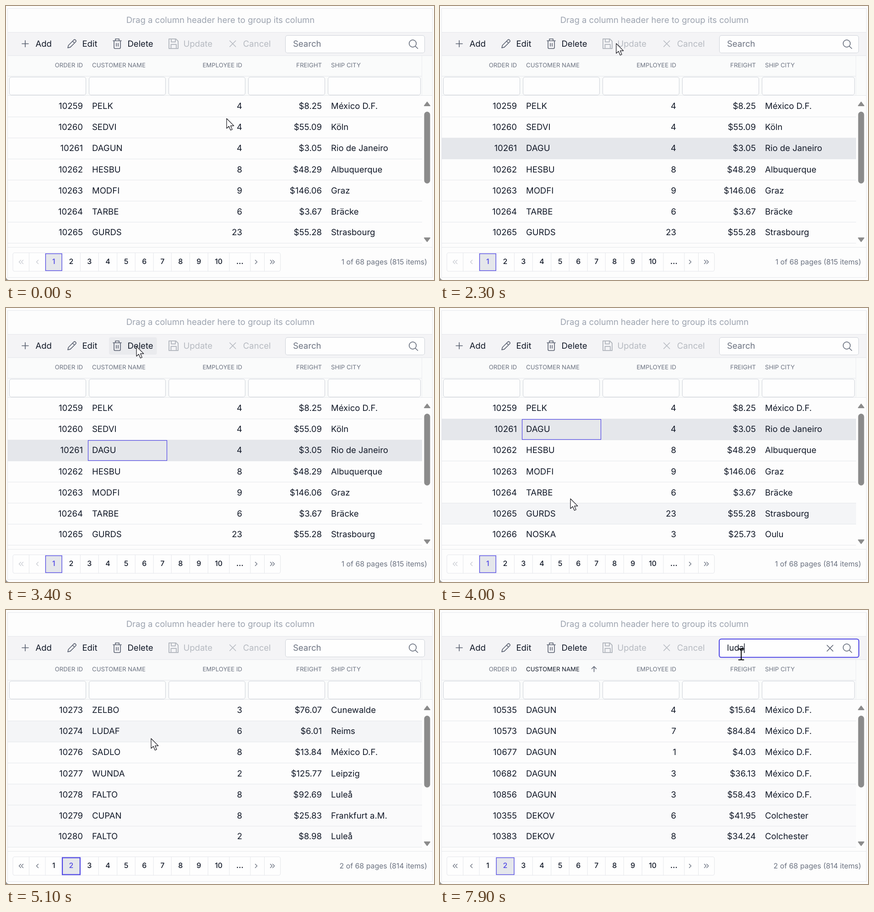
Animation, 935 px wide and 599 px high, one loop 8000 ms. Source, as an HTML page:

```html
<!DOCTYPE html>
<html lang="en">
<head>
<meta charset="utf-8">
<title>Order grid</title>
<style>
  html, body { margin: 0; width: 100%; height: 100%; overflow: hidden; background: #fdfdfd; }
  svg { display: block; width: 935px; height: 599px; }
  text { font-family: Inter, "Liberation Sans", sans-serif; text-rendering: geometricPrecision; white-space: pre; }
</style>
</head>
<body>
<svg id="stage" viewBox="0 0 935 599"></svg>
<script>
const LOOP = 8000, STEP = 100;
const INK = '#111827', ICON = '#596070', GRAY = '#6b7280', MUTED = '#9ca3af', OFF = '#b6bac1';
const LINE = '#e5e7eb', FIELD = '#d1d5db', HOVER = '#f4f5f7', PAPER = '#fefefe', ACCENT = '#4f46e5';
const CELL = 18.5, HEAD = 13.2, PAGE = 15.85;
const TOP = 196, PITCH = 46, LEFT = 4, RIGHT = 909;
const stage = document.getElementById('stage');
const pen = document.createElement('canvas').getContext('2d');

// When each action takes effect, in ms
const at = { select: 500, edit: 700, cut: 1300, caret: 1600, save: 2200, focus: 2800,
  remove: 3600, page: 4600, sort: 5700, search: 7000, type: 7400 };

const parse = s => s.trim().split('\n').map(r => r.trim().split('|'));
const firstPage = parse(`
  10259|PELK|4|$8.25|México D.F.
  10260|SEDVI|4|$55.09|Köln
  10261|DAGUN|4|$3.05|Rio de Janeiro
  10262|HESBU|8|$48.29|Albuquerque
  10263|MODFI|9|$146.06|Graz
  10264|TARBE|6|$3.67|Bräcke
  10265|GURDS|23|$55.28|Strasbourg
  10266|NOSKA|3|$25.73|Oulu`);
const secondPage = parse(`
  10273|ZELBO|3|$76.07|Cunewalde
  10274|LUDAF|6|$6.01|Reims
  10276|SADLO|8|$13.84|México D.F.
  10277|WUNDA|2|$125.77|Leipzig
  10278|FALTO|8|$92.69|Luleå
  10279|CUPAN|8|$25.83|Frankfurt a.M.
  10280|FALTO|2|$8.98|Luleå`);
const sortedPage = parse(`
  10535|DAGUN|4|$15.64|México D.F.
  10573|DAGUN|7|$84.84|México D.F.
  10677|DAGUN|1|$4.03|México D.F.
  10682|DAGUN|3|$36.13|México D.F.
  10856|DAGUN|3|$58.43|México D.F.
  10355|DEKOV|6|$41.95|Colchester
  10383|DEKOV|8|$34.24|Colchester`);

const columns = ['ORDER ID', 'CUSTOMER NAME', 'EMPLOYEE ID', 'FREIGHT', 'SHIP CITY'].map((title, i) => ({
  title, l: LEFT + 174 * i, r: i === 4 ? RIGHT : LEFT + 174 * (i + 1), end: i % 4 !== 1 && i !== 4
}));

// Pointer moves: start, end, x, y
const moves = [
  [0, 0, 482, 246],
  [0, 300, 295, 309],
  [800, 1100, 261, 290],
  [1700, 2100, 385, 82],
  [2300, 2600, 240, 300],
  [2800, 3000, 266, 220],
  [3100, 3400, 285, 84],
  [3500, 3900, 268, 478],
  [3900, 4000, 285, 417],
  [4000, 4400, 139, 566],
  [4600, 5100, 317, 281],
  [5100, 5300, 321, 141],
  [5300, 5500, 315, 134],
  [5600, 6100, 445, 168],
  [6100, 6300, 474, 208],
  [6400, 6500, 690, 218],
  [6600, 7000, 658, 97]
];
const clamp = v => Math.min(1, Math.max(0, v));
const smooth = v => v * v * (3 - 2 * v);

function pointerAt(t) {
  let [px, py] = moves[0].slice(2);
  for (const [from, to, x, y] of moves.slice(1)) {
    const f = smooth(clamp((t - from) / (to - from)));
    px += (x - px) * f;
    py += (y - py) * f;
  }
  return [px, py];
}

const text = (s, x, y, size, fill, extra = '') =>
  `<text x="${x}" y="${y}" font-size="${size}" fill="${fill}" ${extra}>${s}</text>`;
const END = 'text-anchor="end"', MID = 'text-anchor="middle"';
const rect = (x, y, r, b, fill, line = 'none', w = 1, rx = 0) =>
  `<rect x="${x}" y="${y}" width="${r - x}" height="${b - y}" rx="${rx}" fill="${fill}" stroke="${line}" stroke-width="${w}"/>`;
const stroke = (d, color, w = 1.6, fill = 'none') =>
  `<path d="${d}" fill="${fill}" stroke="${color}" stroke-width="${w}" stroke-linecap="round" stroke-linejoin="round"/>`;
const place = (x, y, content) => `<g transform="translate(${x} ${y})">${content}</g>`;
const hline = (y, r = RIGHT) => rect(LEFT, y, r, y + 1, LINE);
const field = (l, r, t, b) => rect(l + .5, t + .5, r - .5, b - .5, PAPER, FIELD, 1.1, 4.5);
const focusField = (l, r, t, b) => rect(l, t, r, b, PAPER, ACCENT, 2, 4.5);
const textWidth = (s, size, weight = 400) => {
  pen.font = `${weight} ${size}px Inter, "Liberation Sans", sans-serif`;
  return pen.measureText(s).width;
};
const cellText = (s, c, y, size, fill, pad = 10) =>
  text(s, c.end ? c.r - pad : c.l + pad, y, size, fill, c.end ? END : '');

function frameParts() {
  const arrow = (y, dir) => stroke(`M914 ${y + 4 * dir}L920 ${y - 4 * dir}L926 ${y + 4 * dir}Z`, '#8b8b8b', 2, '#8b8b8b');
  return rect(0, 0, 935, 599, '#fdfdfd') +
    rect(LEFT, 57, 931, 108, '#f4f4f6') + rect(LEFT, 108, 931, 195, '#fafbfb') +
    [57, 108, 195, 527].map(y => hline(y, 931)).join('') + hline(153) +
    rect(908, 109, RIGHT, 195, '#eceef1') + rect(3.5, 5.5, 931.5, 593.5, 'none', LINE) +
    `<path d="M0 593Q1 598 6 599H0Z" fill="#8f8f8f"/>` +
    text('Drag a column header here to group its column', 468.5, 37, CELL, MUTED, MID) +
    columns.map(c => field(c.l + 3, c.r - 3, 155, 195)).join('') +
    rect(913.5, 231, 926.5, 388, '#8b8b8b', 'none', 0, 6.5) + arrow(214, 1) + arrow(511, -1);
}

const cross = 'M-6.5 -6.5L6.5 6.5M6.5 -6.5L-6.5 6.5';
const tools = [
  { name: 'Add', x: 42, icon: 'M0 -7V7M-7 0H7' },
  { name: 'Edit', x: 144, icon: 'M-9 9L-7.6 3.5L4 -8.2Q6 -10 8 -8Q10 -6 8.2 -4L-3.5 7.6ZM1.5 -5.5L5.6 -1.5' },
  { name: 'Delete', x: 243, icon: 'M-9 -6.5H9M-4 -6.5V-10.5H4V-6.5M-7 -6.5V8Q-7 10.5 -5 10.5H5Q7 10.5 7 8V-6.5M-2 -1V5.5M2 -1V5.5' },
  { name: 'Update', x: 366, icon: 'M-10 -10.5H5L10 -5.5V10.5H-10ZM-5 -10V-4H4V-10M-5.5 10V1.5H6V10', w: 2 },
  { name: 'Cancel', x: 495.3, icon: cross }
];

function toolbar(t, edit) {
  const [px, py] = pointerAt(t);
  let out = tools.map((tool, i) => {
    const on = edit === i > 2;
    const label = tool.x + 23 - (tool.name === 'Update' ? 1.5 : .5);
    const l = tool.x - 18, r = label + textWidth(tool.name, CELL) + 8;
    const over = on && py > 63 && py < 103 && px > l && px < r;
    return (over ? rect(l, 64, r, 102, '#eaebee', 'none', 0, 4) : '') +
      place(tool.x, 82.5, stroke(tool.icon, on ? ICON : OFF, tool.w)) +
      text(tool.name, label, 89, CELL, on ? INK : OFF);
  }).join('');

  const focus = t >= at.search;
  const typed = 'luda'.slice(0, Math.max(0, Math.round((t - at.type) / 125)));
  out += focus ? focusField(610, 915, 63.5, 103.5) : field(610, 915, 64, 103);
  out += text(typed || 'Search', 627, 89, CELL, typed ? INK : GRAY);
  if (focus) {
    const x = 627 + textWidth(typed, CELL);
    out += rect(x, 73, x + 1.4, 94, INK);
  }
  if (typed) out += place(852, 83.5, stroke(cross, ICON));
  return out + stroke('M880.7 82A7.8 7.8 0 1 1 896.3 82A7.8 7.8 0 1 1 880.7 82M894.2 87.8L899.5 93', GRAY, 1.7);
}

function header(sorted) {
  return columns.map((c, i) => cellText(c.title, c, 134, HEAD, sorted && i === 1 ? INK : GRAY)).join('') +
    (sorted ? stroke('M336.5 135V123.5M331.5 128.5L336.5 123.5L341.5 128.5', ICON, 1.5) : '');
}

function editRow(row, t) {
  const values = [row[0], t < at.cut ? row[1] : row[1].slice(0, -1), row[2], row[3].slice(1), row[4]];
  return rect(LEFT, 289, RIGHT, 333, '#f2f3f6') + columns.map((c, i) =>
    (i === 1 ? focusField(c.l + 10, c.r - 10, 290.5, 330) : field(c.l + 11, c.r - 11, 291, 331)) +
    cellText(values[i], c, 318, CELL, i ? INK : MUTED, c.end ? 24.5 : 27)).join('') +
    (t >= at.caret ? rect(258, 300, 259.3, 323, INK) : '');
}

function rowsAt(t) {
  if (t >= at.sort) return sortedPage;
  if (t >= at.page) return secondPage;
  return firstPage
    .map((r, i) => i === 2 && t >= at.save ? [r[0], r[1].slice(0, -1), ...r.slice(2)] : r)
    .filter((r, i) => i !== 1 || t < at.remove);
}

function grid(t, edit, page2) {
  const selected = page2 || t < at.select ? -1 : t >= at.remove ? 1 : 2;
  // The highlight trails the pointer a little
  const [hx, hy] = pointerAt(t - 30);
  const over = t > at.save && t < at.sort && hx < RIGHT ? Math.floor((hy - TOP) / PITCH) : -1;

  return rowsAt(t).slice(0, 7).map((row, i) => {
    const top = TOP + PITCH * i + 1, raised = edit && i > 1 && i < 5 ? 1 : 0;
    const bottom = TOP + PITCH * (i + 1) - raised;
    if (edit && i === 2) return editRow(row, t) + hline(bottom);
    const fill = i === selected ? LINE : i === over ? HOVER : page2 && i > 3 ? '#fafafb' : 'none';
    const base = 225 + PITCH * i + (i > 2 && i < 6 && !edit ? 1 : 0);
    return rect(LEFT, top, RIGHT, bottom, fill) + hline(bottom) +
      (i === selected && t >= at.focus ? rect(179.5, top + .5, 351.5, bottom - .5, 'none', ACCENT, 1.2) : '') +
      row.map((s, k) => cellText(s, columns[k], base, CELL, INK)).join('');
  }).join('');
}

function pager(t, page2) {
  const current = page2 ? 2 : 1, arrowWidth = 35.5;
  const divider = x => rect(x - .5, 540, x + .5, 580, LINE);
  const chevrons = (x, dir, color, count) => [0, 1].slice(0, count).map(k =>
    place(x + (count - 1) * (k * 5 - 2.5), 559.5, stroke(`M${2 * dir} -4L${-2 * dir} 0L${2 * dir} 4`, color, 1.4))).join('');
  const back = page2 ? GRAY : '#c9ccd2';
  let x = 15 + 2 * arrowWidth;
  let out = rect(15, 539.5, 599.5, 580, PAPER, LINE, 1.1, 4) + divider(15 + arrowWidth) + divider(x) +
    chevrons(33, 1, back, 2) + chevrons(68.5, 1, back, 1);

  for (let n = 1; n <= 11; n++) {
    const label = n > 10 ? '...' : String(n), weight = n > 10 ? 700 : 500;
    const w = 30 + textWidth(label, PAGE, weight), on = n === current;
    out += divider(x + w);
    if (on) out += rect(x + .5, 541.5, x + w - .5, 578.5, LINE, ACCENT, page2 && t < at.sort ? 2.2 : 1.3);
    out += text(label, x + w / 2, 564, PAGE, on ? ACCENT : INK, `${MID} font-weight="${weight}"`);
    x += w;
  }
  return out + divider(564.5) + chevrons(546.5, -1, GRAY, 1) + chevrons(582, -1, GRAY, 2) +
    text(`${current} of 68 pages (${t >= at.remove ? 814 : 815} items)`, 920, 564.5, PAGE, GRAY, END);
}

function pointer(t, edit) {
  const [x, y] = pointerAt(t);
  const within = (l, r, top, bottom) => x > l && x < r && y > top && y < bottom;
  const beam = columns.some(c => within(c.l + 3, c.r - 3, 155, 195)) ||
    within(610, 915, 64, 103) || edit && within(188, 342, 291, 330);
  return place(x, y, beam
    ? stroke('M-5.5 -12H-2Q0 -12 0 -10Q0 -12 2 -12H5.5M0 -10V10M-5.5 12H-2Q0 12 0 10Q0 12 2 12H5.5', '#000', 1.9)
    : stroke('M0 0V21.5L5 17L8.6 25.5L12.2 24L8.6 15.8H15.8Z', '#15151c', 1.2, '#fff'));
}

const backdrop = frameParts();

function draw(t) {
  const edit = t >= at.edit && t < at.save, page2 = t >= at.page;
  stage.innerHTML = backdrop + toolbar(t, edit) + header(t >= at.sort) +
    grid(t, edit, page2) + pager(t, page2) + pointer(t, edit);
}

const start = performance.now();
let shown = -1;
function tick() {
  const ms = Math.max(0, performance.now() - start) % LOOP;
  const t = Math.floor(ms / STEP) * STEP;
  if (t !== shown) draw(shown = t);
  requestAnimationFrame(tick);
}
tick();
</script>
</body>
</html>
```
